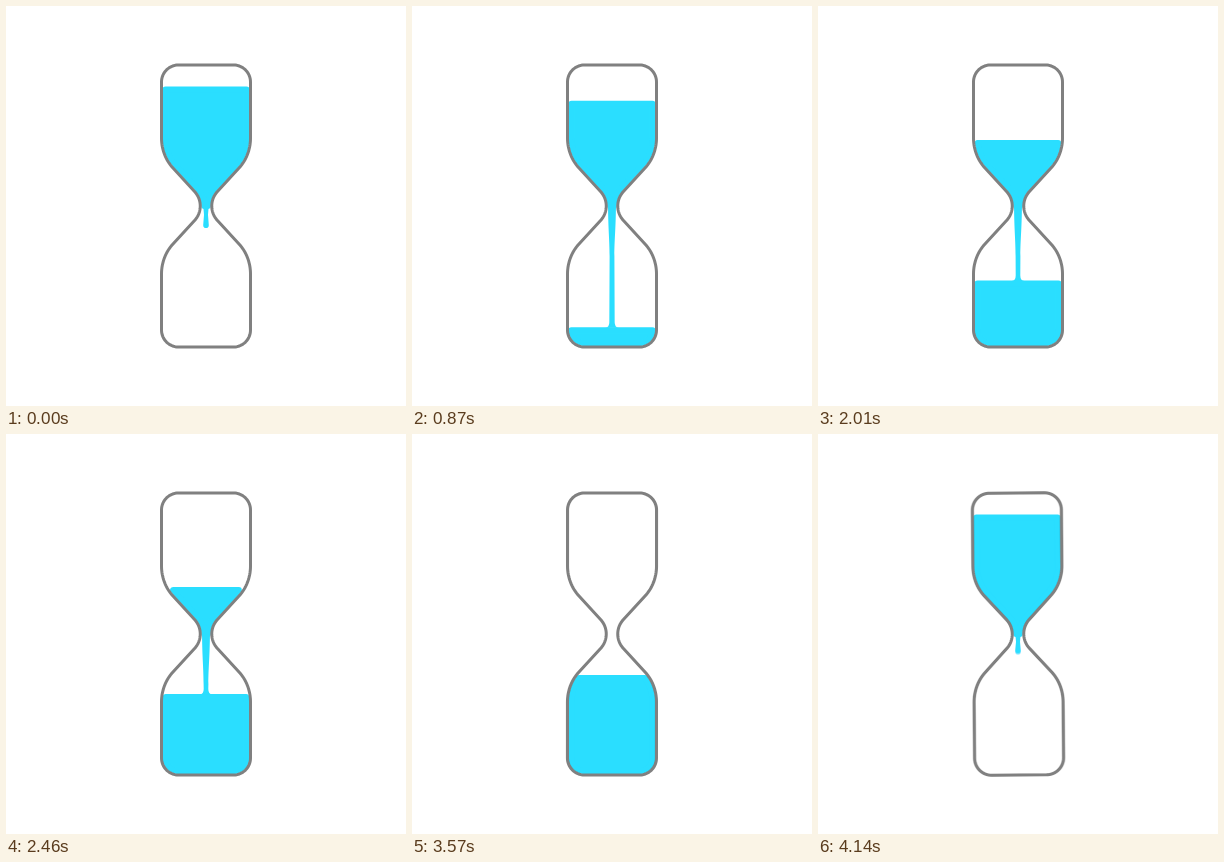
An HTML page with a canvas that plays this animation: 400x400 px, repeating every 4170 ms.

```html
<!DOCTYPE html>
<html lang="en">
<head>
<meta charset="utf-8">
<title>Hourglass</title>
<style>
html, body { margin: 0; width: 100%; height: 100%; overflow: hidden; background: #fff; }
canvas { display: block; width: 100vw; height: 100vh; }
</style>
</head>
<body>
<canvas id="stage" width="400" height="400"></canvas>
<script>
const LOOP = 4170, STEP = 30, SPIN_START = 3567, SPIN_TIME = 600, SHUTTER = 15, SAMPLES = 20;
const LIQUID = '#2adeff', GLASS = '#808080', ROUND = 3;

const ctx = document.getElementById('stage').getContext('2d', { willReadFrequently: true });
const buffer = document.createElement('canvas');
buffer.width = buffer.height = 400;
const pen = buffer.getContext('2d');

const clamp = (v, lo = 0, hi = 1) => Math.min(hi, Math.max(lo, v));
const mix = (a, b, k) => a + (b - a) * k;

// Smooth curve through [time, value] knots
function track(knots) {
  const slope = i => {
    const a = knots[Math.max(0, i - 1)], b = knots[Math.min(knots.length - 1, i + 1)];
    return (b[1] - a[1]) / (b[0] - a[0]);
  };
  return t => {
    const last = knots.length - 1;
    if (t <= knots[0][0]) return knots[0][1];
    if (t >= knots[last][0]) return knots[last][1];
    const i = knots.findIndex(k => k[0] > t) - 1;
    const [t0, v0] = knots[i], [t1, v1] = knots[i + 1];
    const h = t1 - t0, u = (t - t0) / h, u2 = u * u, u3 = u2 * u;
    return v0 * (2 * u3 - 3 * u2 + 1) + v1 * (3 * u2 - 2 * u3) +
      h * (slope(i) * (u3 - 2 * u2 + u) + slope(i + 1) * (u3 - u2));
  };
}

// Positions are relative to the neck of the glass
const upperLevel = track([[0, -119.5], [480, -114.5], [1260, -94], [2010, -66], [2910, -27], [3280, -8], [3400, 0]]);
const lowerLevel = track([[360, 140], [480, 138], [1260, 104], [2010, 74.5], [2910, 48], [3450, 41]]);
const dripTip = track([[-100, 2], [-30, 20], [0, 22], [180, 58], [360, 139]]);

function curve(p, from = 0) {
  const out = [];
  for (let i = 0; i <= 16; i++) {
    const t = mix(from, 1, i / 16), s = 1 - t;
    out.push([0, 1].map(k =>
      s * s * s * p[0][k] + 3 * s * s * t * p[1][k] + 3 * s * t * t * p[2][k] + t * t * t * p[3][k]));
  }
  return out;
}

const side = [
  ...curve([[11, -14], [4, -6], [4, 6], [11, 14]], 0.5),
  ...curve([[33, 38], [40.5, 46], [44.5, 57], [44.5, 68]]),
  ...curve([[44.5, 124], [44.5, 133.4], [36.9, 141], [27.5, 141]])
];
const mirror = (pts, sx, sy) => pts.map(([x, y]) => [x * sx, y * sy]);
const closeHalf = pts => [...pts, ...mirror(pts, -1, 1).reverse()];

function inset(pts, d) {
  return pts.map(([x, y], i) => {
    if (i === 0) return [x - d, y];
    if (i === pts.length - 1) return [x, y - d];
    const a = pts[i - 1], b = pts[i + 1];
    const dx = b[0] - a[0], dy = b[1] - a[1], len = Math.hypot(dx, dy);
    return [x - dy / len * d, y + dx / len * d];
  });
}

function trace(pts) {
  const path = new Path2D();
  pts.forEach(([x, y]) => path.lineTo(x, y));
  path.closePath();
  return path;
}

const chamber = closeHalf(inset(side, ROUND + 1));
const outline = trace([...closeHalf(side), ...mirror(closeHalf(side), -1, -1)]);

function rotate(pts, a) {
  const c = Math.cos(a), s = Math.sin(a);
  return pts.map(([x, y]) => [x * c - y * s, x * s + y * c]);
}

function below(pts, level) {
  const out = [];
  pts.forEach((p, i) => {
    const q = pts[(i + 1) % pts.length];
    if (p[1] >= level) out.push(p);
    if ((p[1] >= level) !== (q[1] >= level))
      out.push([mix(p[0], q[0], (level - p[1]) / (q[1] - p[1])), level]);
  });
  return out;
}

function area(pts) {
  let sum = 0;
  pts.forEach((p, i) => {
    const q = pts[(i + 1) % pts.length];
    sum += p[0] * q[1] - q[0] * p[1];
  });
  return Math.abs(sum) / 2;
}

const pool = (angle, level) => below(rotate(chamber, angle), level + ROUND);
const areaBefore = area(pool(0, 41)), areaAfter = area(pool(Math.PI, -119.5));

function levelFor(angle, target) {
  const pts = rotate(chamber, angle);
  let lo = -150, hi = 150;
  for (let i = 0; i < 18; i++) {
    const mid = (lo + hi) / 2;
    if (area(below(pts, mid + ROUND)) > target) lo = mid; else hi = mid;
  }
  return lo;
}

// Ease equal to cubic-bezier(.5, 0, .5, 1)
function ease(p) {
  let lo = 0, hi = 1;
  for (let i = 0; i < 24; i++) {
    const m = (lo + hi) / 2;
    if (1.5 * m * (1 - m) + m * m * m < p) lo = m; else hi = m;
  }
  return lo * lo * (3 - 2 * lo);
}
const spin = t => ease(clamp((t - SPIN_START) / SPIN_TIME));

function drawPool(angle, level) {
  const pts = pool(angle, level);
  if (pts.length < 3) return;
  const path = trace(pts);
  pen.fill(path);
  pen.stroke(path);
}

function drawDrip(tip) {
  if (tip < 3) return;
  pen.beginPath();
  pen.moveTo(-4, -5);
  pen.quadraticCurveTo(-2, 3, -2, Math.min(tip * 0.4, 40));
  pen.lineTo(-2.8, tip - 3);
  pen.arc(0, tip - 2.8, 2.8, Math.PI, 0, true);
  pen.lineTo(2, Math.min(tip * 0.4, 40));
  pen.quadraticCurveTo(2, 3, 4, -5);
  pen.fill();
}

function drawStream(t, level) {
  const top = t < 3350 ? -6 : mix(-6, level, clamp((t - 3350) / 130) ** 2);
  if (top >= level - 1) return;
  const foot = mix(4, 2.3, clamp((t - 480) / 500));
  const bend = Math.max(top, Math.min(50, level - 8));
  const flare = Math.min(5, (level - top) / 2), wide = foot + 4;
  pen.beginPath();
  pen.moveTo(-4, top);
  pen.bezierCurveTo(-4, mix(top, bend, 0.5), -2.4, mix(top, bend, 0.7), -2.4, bend);
  pen.lineTo(-foot, level - flare);
  pen.quadraticCurveTo(-foot, level, -wide, level + 0.5);
  pen.lineTo(wide, level + 0.5);
  pen.quadraticCurveTo(foot, level, foot, level - flare);
  pen.lineTo(2.4, bend);
  pen.bezierCurveTo(2.4, mix(top, bend, 0.7), 4, mix(top, bend, 0.5), 4, top);
  pen.fill();
}

function drawLower(t, level) {
  if (level < 126) return drawPool(0, level);
  const half = mix(8, 43.5, clamp((t - 350) / 205));
  pen.beginPath();
  pen.roundRect(-half, level, half * 2, 141 - level, Math.min(ROUND, (141 - level) / 2));
  pen.fill();
}

function drawScene(t) {
  const turn = spin(t), angle = turn * Math.PI;
  pen.setTransform(1, 0, 0, 1, 0, 0);
  pen.fillStyle = '#fff';
  pen.fillRect(0, 0, 400, 400);
  pen.translate(200, 200);
  pen.fillStyle = pen.strokeStyle = LIQUID;
  pen.lineWidth = ROUND * 2;
  pen.lineJoin = 'round';

  pen.save();
  pen.rotate(angle);
  pen.clip(outline);
  pen.rotate(-angle);
  if (t >= SPIN_START) {
    drawPool(angle, levelFor(angle, mix(areaBefore, areaAfter, turn)));
    drawDrip(dripTip(t - LOOP));
  } else {
    drawPool(Math.PI, upperLevel(t));
    if (t < 360) {
      drawDrip(dripTip(t));
    } else {
      const level = lowerLevel(t);
      drawLower(t, level);
      drawStream(t, level);
    }
  }
  pen.restore();

  pen.rotate(angle);
  pen.strokeStyle = GLASS;
  pen.lineWidth = 3;
  pen.stroke(outline);
}

// Faint smeared grey vanishes into the white
function dropFaint() {
  const image = ctx.getImageData(0, 0, 400, 400), d = image.data;
  for (let i = 0; i < d.length; i += 4)
    if (d[i] > 223 && d[i + 2] - d[i] < 8) d[i] = d[i + 1] = d[i + 2] = 255;
  ctx.putImageData(image, 0, 0);
}

function render(t) {
  const sweep = (spin(t + SHUTTER / 2) - spin(t - SHUTTER / 2)) * 180;
  const count = sweep > 0.05 ? SAMPLES : 1;
  for (let i = 0; i < count; i++) {
    drawScene(count > 1 ? t + ((i + 0.5) / count - 0.5) * SHUTTER : t);
    ctx.globalAlpha = 1 / (i + 1);
    ctx.drawImage(buffer, 0, 0);
  }
  ctx.globalAlpha = 1;
  if (sweep > 3) dropFaint();
}

const start = performance.now();
let shown = -1;
function tick() {
  const t = Math.floor((performance.now() - start) % LOOP / STEP) * STEP;
  if (t !== shown) render(shown = t);
  requestAnimationFrame(tick);
}
tick();
</script>
</body>
</html>
```
